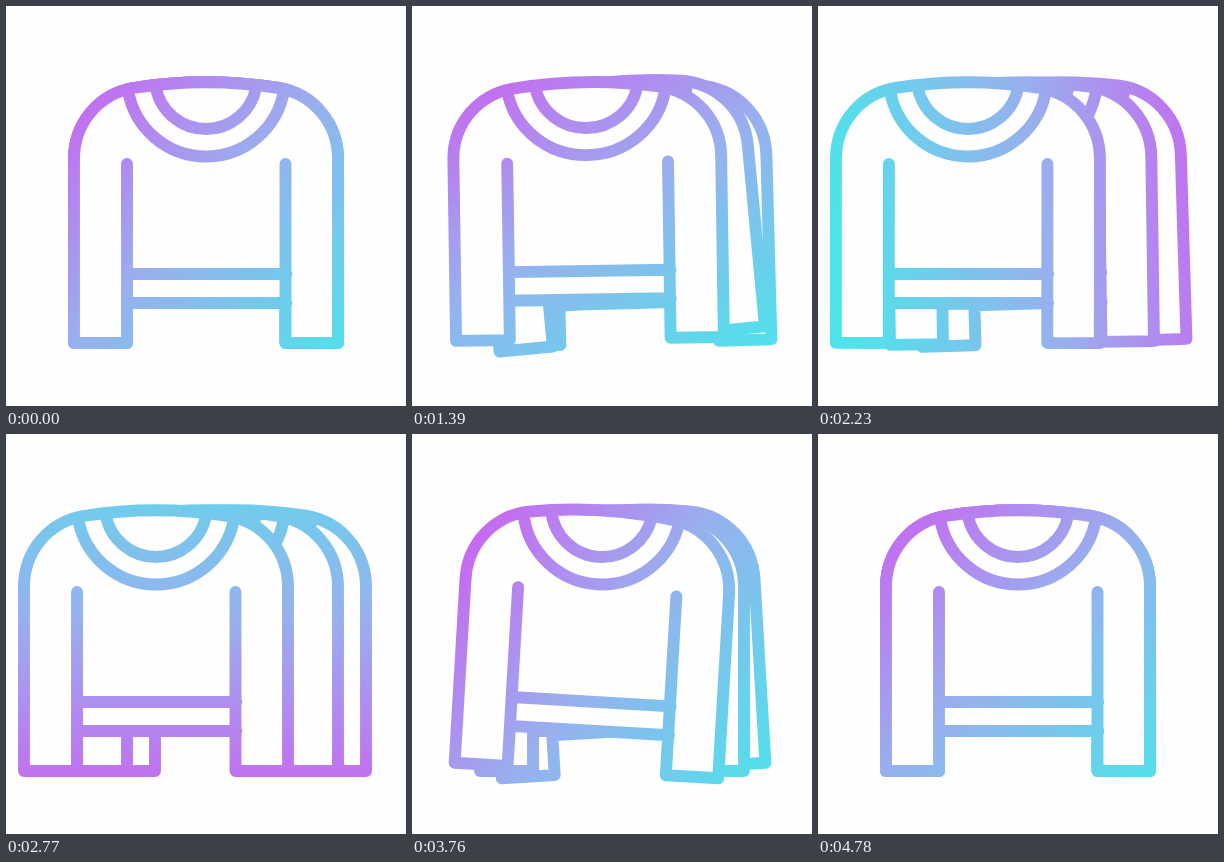
An HTML page with a canvas that plays this animation: 400 by 400 pixels, repeating every 4.81 s.

```html
<!DOCTYPE html>
<html lang="en">
<head>
<meta charset="utf-8">
<title>Sweaters</title>
<style>
html, body { margin: 0; width: 100%; height: 100%; overflow: hidden; background: #fefefe; }
canvas { display: block; width: 400px; height: 400px; }
</style>
</head>
<body>
<canvas id="stage"></canvas>
<script>
const LOOP = 4810, OPEN = 1030, CLOSE = 3150, STEP = 30;
const PIVOT = { x: 200, y: 57 };

const canvas = document.getElementById('stage');
const ctx = canvas.getContext('2d');
const ratio = window.devicePixelRatio || 1;
canvas.width = canvas.height = 400 * ratio;

const shoulders = 'M68 153C68 117 93 88 127 82C175 74.5 225 74.5 273 82C307 88 332 117 332 153';
const body = new Path2D(shoulders + 'V337H279.5V297H121V337H68Z');
const lines = new Path2D(
  shoulders + 'V337H279.5V158M68 153V337H121V158' +
  'M121 268H280.3M121 297H280.3' +
  'M122 84A79 79 0 0 0 278 84M149.8 81A51 51 0 0 0 250.2 81');

// Back to front. rest: shift while spread; push: extra shift while opening;
// lean: extra shift before closing; amp, half, delay: opening swing;
// side: direction of the lag while closing
const sweaters = [
  { rest: 28, push: 8, lean: 10, amp: 7, half: 330, delay: 0, side: -1, squash: 0 },
  { rest: 0, push: -9, lean: 1, amp: -8, half: 330, delay: 250, side: 0, squash: 0.015 },
  { rest: -50, push: 0, lean: -3, amp: -4, half: 400, delay: -5, side: 1, squash: 0.022 }
];

const part = (t, start, span) => Math.min(1, Math.max(0, (t - start) / span));
const ease = (t, start, span) => (1 - Math.cos(Math.PI * part(t, start, span))) / 2;
const arch = (t, start, span) => Math.sin(Math.PI * part(t, start, span));
const hump = (t, start, span) => arch(t, start, span) ** 2;

function shift(s, t) {
  const spread = ease(t, OPEN, 700) - ease(t, 3400, 500);
  return s.rest * spread + s.push * hump(t, OPEN, 1200) + s.lean * hump(t, CLOSE, 450);
}

// Damped pendulum while spreading
function openSwing(s, t) {
  const u = Math.max(0, t - OPEN - s.delay);
  return s.amp * (1 - part(t, OPEN, 1650)) * Math.sin(Math.PI * u / s.half);
}

// Each sweater lags its own way at first, then all swing as one
function closeSwing(s, t) {
  const half = 470, from = 4780 - 3 * half;
  const wave = 8 * arch(t, 3300, 1480) * Math.sin(Math.PI * (t - from) / half);
  return t < from + half ? wave * s.side : wave;
}

function gradient(t) {
  const a = Math.PI * (0.25 + 2 * ease(t, 1000, 3050));
  const dx = 210 * Math.cos(a), dy = 210 * Math.sin(a);
  const ink = ctx.createLinearGradient(222 - dx, 185 - dy, 222 + dx, 185 + dy);
  ['#cf5cf0', '#98b0ee', '#4ee3ea'].forEach((c, i) => ink.addColorStop(i / 2, c));
  return ink;
}

// Transforms the path alone, so the gradient stays fixed to the stage
function moved(path, matrix) {
  const p = new Path2D();
  p.addPath(path, matrix);
  return p;
}

function paint(t) {
  ctx.setTransform(ratio, 0, 0, ratio, 0, 0);
  ctx.fillStyle = '#fefefe';
  ctx.fillRect(0, 0, 400, 400);
  ctx.strokeStyle = gradient(t);
  ctx.lineWidth = 11.9;
  ctx.lineCap = ctx.lineJoin = 'round';

  for (const s of sweaters) {
    const q = s.squash * hump(t, OPEN, 1200);
    const matrix = new DOMMatrix()
      .translate(PIVOT.x + shift(s, t), PIVOT.y)
      .rotate(openSwing(s, t) + closeSwing(s, t))
      .scale(1 + q, 1 - q)
      .translate(-PIVOT.x, -PIVOT.y);
    ctx.fill(moved(body, matrix));
    ctx.stroke(moved(lines, matrix));
  }
}

const start = performance.now();
function tick() {
  const t = (performance.now() - start) % LOOP;
  paint(t < OPEN ? 0 : OPEN + Math.floor((t - OPEN) / STEP) * STEP);
  requestAnimationFrame(tick);
}
tick();
</script>
</body>
</html>
```
